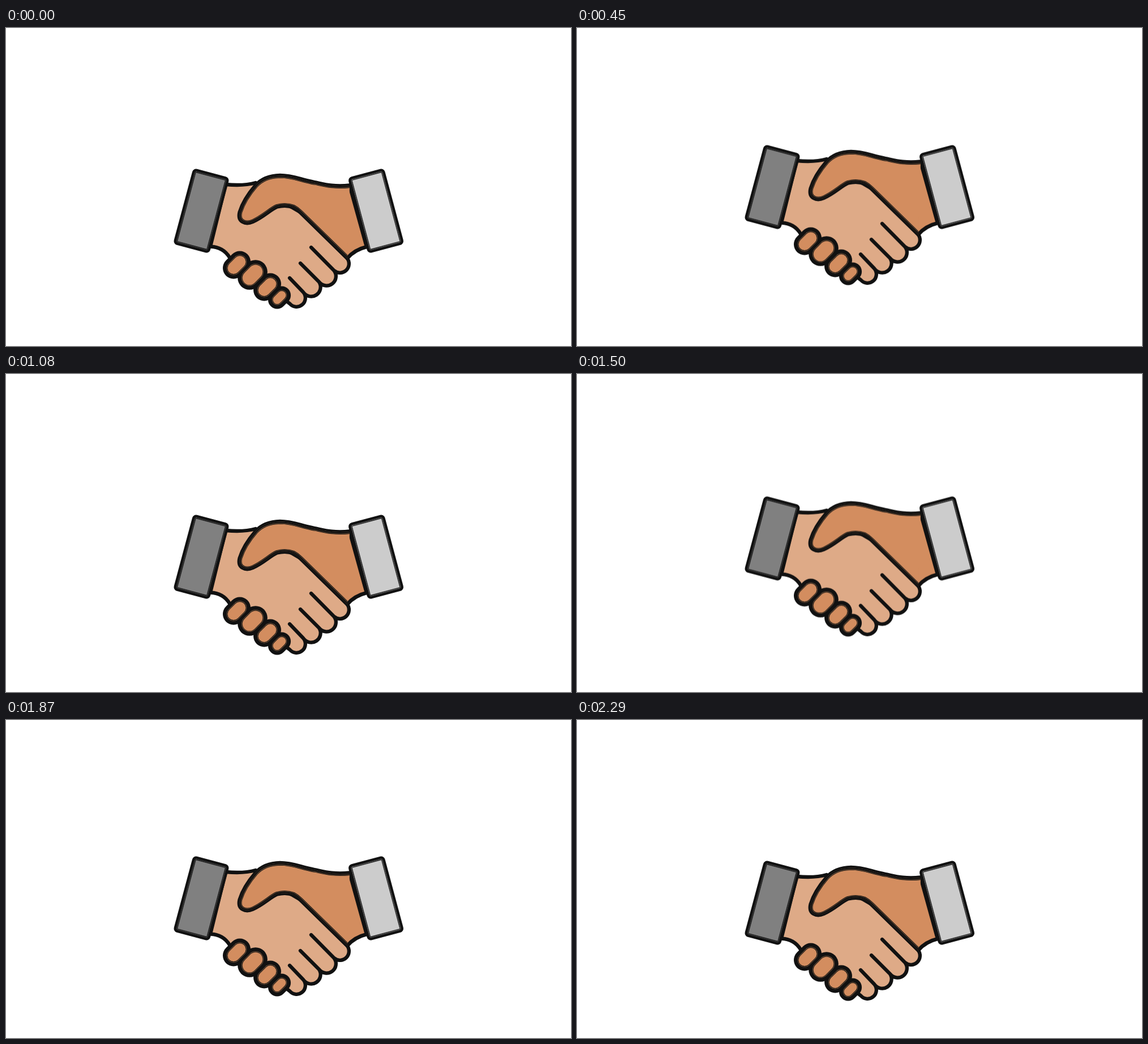
An HTML page for the animation above (2800 ms loop, 998 by 561 pixels).

```html
<!DOCTYPE html>
<html lang="en">
<head>
<meta charset="utf-8">
<title>Handshake</title>
<style>
  html, body { margin: 0; width: 100%; height: 100%; overflow: hidden; background: #fff; }
  svg { display: block; width: 100%; height: 100%; }
  path, line, rect { stroke-linecap: round; stroke-linejoin: round; }
  .ink { stroke: #111; }
  .line { fill: none; }
</style>
</head>
<body>
<svg viewBox="0 0 998 561">
  <defs>
    <path id="thumb" d="M607 278C578 281 562 276 545 272.500C520 268 507 260.500 484 260.500C462 261 450 268 441 278C428 293 418 309 413 325C409 342 423 347 436 341.500C455 333 467 320 479 315Q494 311 508 316Q514 319 520 325L603 406"/>
    <clipPath id="inside"><use href="#thumb"/></clipPath>
  </defs>
  <g id="shake">
    <path class="ink" fill="#deaa87" stroke-width="6.300" d="M388 276Q420 279 441 273L460 290L520 325L602.500 406
      A16 16 0 0 1 579.500 428L539 387L579.500 428
      A16 16 0 0 1 553 448L520 415L553 448
      A16 16 0 0 1 525 466L501 441L525 466
      A15 15 0 0 1 501.500 486.500L497 483L395 405Q384 386.500 361 385.500Z"/>
    <path class="ink" fill="#d38d5f" stroke-width="6.500" d="M607 278L545 272.500L484 260.500L441 278L413 325L436 341.500L479 315L508 316L520 325L603 406Q616 391 637 386Z" stroke="none" style="stroke:none"/>
    <path class="ink line" stroke-width="6.500" d="M603 406Q616 391 637 386L607 278"/>
    <use href="#thumb" fill="#d38d5f" class="ink" stroke-width="7.300"/>
    <g class="line" clip-path="url(#inside)">
      <use href="#thumb" class="ink" stroke-width="8.400"/>
      <use href="#thumb" stroke="#8c6445" stroke-width="6.400"/>
      <use href="#thumb" class="ink" stroke-width="5.200"/>
    </g>
    <g id="fingers"></g>
    <g id="cuffs"></g>
  </g>
</svg>
<script>
const add = (parent, tag, attrs) => {
  const node = document.createElementNS('http://www.w3.org/2000/svg', tag);
  for (const name in attrs) node.setAttribute(name, attrs[name]);
  document.getElementById(parent).append(node);
};

// centre x, centre y, half length of the axis, fill radius, outline radius
const fingers = [
  [407.5, 418, 7.8, 12, 19],
  [435.5, 435.5, 7.5, 14, 21],
  [461.5, 457, 7.7, 12, 19],
  [483, 475.5, 5.7, 9, 16]
];
const capsule = ([x, y, half], radius, stroke) => {
  const d = half * Math.SQRT1_2;
  add('fingers', 'line', {
    x1: x - d, y1: y + d, x2: x + d, y2: y - d, stroke, 'stroke-width': 2 * radius
  });
};
for (const finger of fingers) capsule(finger, finger[4], '#111');
for (const finger of fingers) {
  const radius = finger[3];
  capsule(finger, radius + .2, '#8c6445');
  capsule(finger, radius - .5, '#111');
  capsule(finger, radius - 1.5, '#d38d5f');
}

function cuff(x, angle, fill) {
  const box = (inset, rx, paint) => add('cuffs', 'rect', {
    x: inset - 33.25, y: inset - 69.35, width: 66.5 - 2 * inset, height: 138.7 - 2 * inset, rx,
    transform: `translate(${x} 322.5) rotate(${angle})`, ...paint
  });
  box(3, 4, { fill, class: 'ink', 'stroke-width': 6 });
  box(5.2, 2, { stroke: fill, class: 'line', 'stroke-width': .6 });
  box(6.1, 1, { class: 'ink line', 'stroke-width': 1.1 });
}
cuff(345, 15, '#808080');
cuff(653.5, -15, '#ccc');

// [step, height] corners of the bounce, at 24 steps per second
const bounce = [[0, 0], [5, 162], [10, 8], [14, 143.5], [15, 179], [20, 0]];
const duration = 2800;
const stepTime = step => 10 * Math.floor(step * 100 / 24);

function heightAt(step) {
  const i = bounce.findIndex(([end]) => end >= step);
  if (i === 0) return bounce[0][1];
  const [[a, from], [b, to]] = [bounce[i - 1], bounce[i]];
  return from + (to - from) * (step - a) / (b - a);
}

const frames = [];
for (const start of [0, 1460]) {
  for (let step = 0; step <= 20; step++) {
    frames.push({
      offset: (start + stepTime(step)) / duration,
      transform: `translateY(${-heightAt(step)}px)`,
      easing: 'step-end'
    });
  }
}
frames.push({ offset: 1, transform: 'translateY(0px)' });
document.getElementById('shake').animate(frames, { duration, iterations: Infinity });
</script>
</body>
</html>
```
